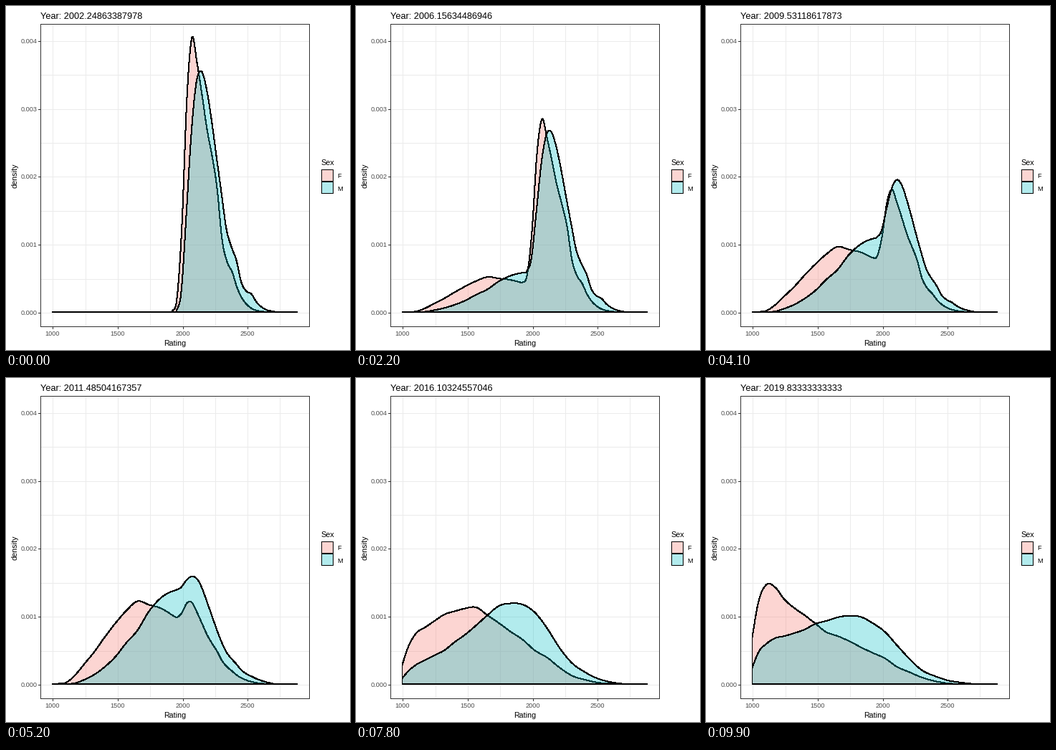
A matplotlib script for the animation above (10000 ms loop, 480x480 px).

```python
import numpy as np
import matplotlib.pyplot as plt
from matplotlib.animation import FuncAnimation
from matplotlib.patches import Polygon, Rectangle

SIZE, DPI, FRAMES = 480, 100, 100
PX = 72 / DPI  # points per pixel
BASE, LEFT, RIGHT = 426.5, 64, 406
GRID, DARK, LABEL = "#EBEBEB", "#333333", "#4D4D4D"
FILLS = {"F": "#F8766D", "M": "#00BFC4"}

plt.rcParams["font.family"] = "Liberation Sans"

xs = np.linspace(LEFT, RIGHT, 513)


def smooth(kx, ky):
    """Cubic Hermite curve through the knots, zero outside them."""
    slope = np.gradient(ky, kx)
    i = np.clip(np.searchsorted(kx, xs, side="right") - 1, 0, len(kx) - 2)
    h = kx[i + 1] - kx[i]
    t = (xs - kx[i]) / h
    y = ((1 + 2 * t) * (1 - t) ** 2 * ky[i] + t * (1 - t) ** 2 * h * slope[i]
         + t * t * (3 - 2 * t) * ky[i + 1] + t * t * (t - 1) * h * slope[i + 1])
    return np.where((xs < kx[0]) | (xs > kx[-1]), 0, np.maximum(y, 0))


def narrow(start, *heights):
    """Bump with evenly spaced knots."""
    return smooth(start + 7.0 * np.arange(len(heights)), np.array(heights, float))


def wide(*heights):
    """Full-width hump, knots denser near the left edge."""
    u = np.linspace(0, 1, len(heights))
    return smooth(LEFT + 310 * u ** 1.2, np.array(heights, float))


# Density heights in pixels at each key time
f_first = narrow(231, 0, 19, 122, 300, 383, 348, 303, 255, 218, 173, 101, 70,
                 56, 34, 19, 10, 4.5, 2, 0.8, 0)
f_second = wide(0, 0.5, 2.5, 14, 32, 51, 74, 96, 116, 131, 125.5, 120, 108.5,
                92, 66.5, 39, 23, 10.5, 4, 0.8, 0)
f_third = wide(27, 52, 71, 79, 88, 97, 101.5, 105.5, 107, 96, 85, 73, 62, 47,
               37, 23, 11.5, 6, 2, 0.5, 0)
f_last = wide(66, 114, 138.5, 135, 118, 106, 96, 84.5, 72.5, 67, 60, 51.5,
              43.5, 36, 24, 16.5, 9, 4, 1, 0, 0)

m_first = narrow(237, 0, 28, 134, 248, 320, 336, 313, 270, 218, 167, 116, 91,
                 72, 41, 29, 25, 14, 7, 3, 1.3, 0)
m_second = wide(0, 0, 0.3, 1.3, 7, 15, 27, 43, 65, 85, 115, 136, 147, 147.5,
                122.5, 80, 43, 23.5, 11, 4.5, 0)
m_third = wide(8, 18, 27, 33.5, 40, 47, 58.5, 69, 82, 96, 109, 112.5, 111,
               100, 78, 50.5, 29, 16.5, 7.5, 2.5, 0)
m_last = wide(23, 44, 56, 64, 67, 71, 76, 84, 88, 93, 95.3, 93.7, 85, 73, 54,
              35, 19, 11, 5, 2, 0)

KEYS = [0, 59, 78, 99]
CURVES = {"F": [f_first, f_second, f_third, f_last],
          "M": [m_first, m_second, m_third, m_last]}


def outline(sex, frame):
    k = min(np.searchsorted(KEYS, frame, side="right"), len(KEYS) - 1)
    t = (frame - KEYS[k - 1]) / (KEYS[k] - KEYS[k - 1])
    a, b = CURVES[sex][k - 1:k + 1]
    top = np.column_stack([xs, BASE - a - (b - a) * t])
    return np.vstack([top, [(RIGHT, BASE), (LEFT, BASE)]])


fig = plt.figure(figsize=(SIZE / DPI, SIZE / DPI), dpi=DPI, facecolor="white")
ax = fig.add_axes([0, 0, 1, 1])
ax.set_xlim(-0.5, SIZE - 0.5)
ax.set_ylim(SIZE - 0.5, -0.5)  # integers fall on pixel centres
ax.axis("off")


def line(x, y, color):
    ax.plot(x, y, color=color, lw=PX, antialiased=False,
            solid_capstyle="butt", zorder=1)


def label(x, y, s, px, color="black", **kw):
    return ax.text(x, y, s, fontsize=px * PX, color=color, va="baseline", **kw)


def style(sex):
    rgb = [int(FILLS[sex][i:i + 2], 16) / 255 for i in (1, 3, 5)]
    return dict(facecolor=(*rgb, 0.3), edgecolor="black", lw=PX,
                antialiased=False)


# Grid, ticks and tick labels
for n in range(8):
    x = round(64.3 + n * 45.3)
    line([x, x], [25, 446], GRID)
    if n % 2 == 0:
        line([x, x], [446, 449], DARK)
        label(x, 460, str(1000 + 250 * n), 9.2, LABEL, ha="center")
for n in range(9):
    y = round(427 - n * 47.4)
    line([47, 422], [y, y], GRID)
    if n % 2 == 0:
        line([44, 47], [y, y], DARK)
        label(43, y + 3.5, f"{n / 2000:.3f}", 9.2, LABEL, ha="right")

areas = {}
for z, sex in enumerate("FM"):
    areas[sex] = ax.add_patch(Polygon(outline(sex, 0), zorder=2 + z,
                                      joinstyle="round", **style(sex)))
ax.add_patch(Rectangle((47, 24), 375, 422, fill=False, edgecolor=DARK,
                       lw=PX, antialiased=False, zorder=5))

# Titles and legend
title = label(47, 17, "", 12.8)
label(235, 473, "Rating", 10.6, ha="center")
label(15, 236, "density", 10.7, ha="center", rotation=90,
      rotation_mode="anchor")
label(439, 221, "Sex", 10.8)
for n, sex in enumerate("FM"):
    ax.add_patch(Rectangle((439, 227 + 17 * n), 16, 16, **style(sex)))
    label(462, 240 + 17 * n, sex, 9.2)

YEARS = np.linspace(2002 + 91 / 366, 2019 + 10 / 12, FRAMES)


def update(frame):
    title.set_text(f"Year: {YEARS[frame]:.15g}")
    for sex, area in areas.items():
        area.set_xy(outline(sex, frame))
    return [title, *areas.values()]


anim = FuncAnimation(fig, update, frames=FRAMES, interval=100, repeat=True,
                     repeat_delay=0, blit=False)
plt.show()
```
